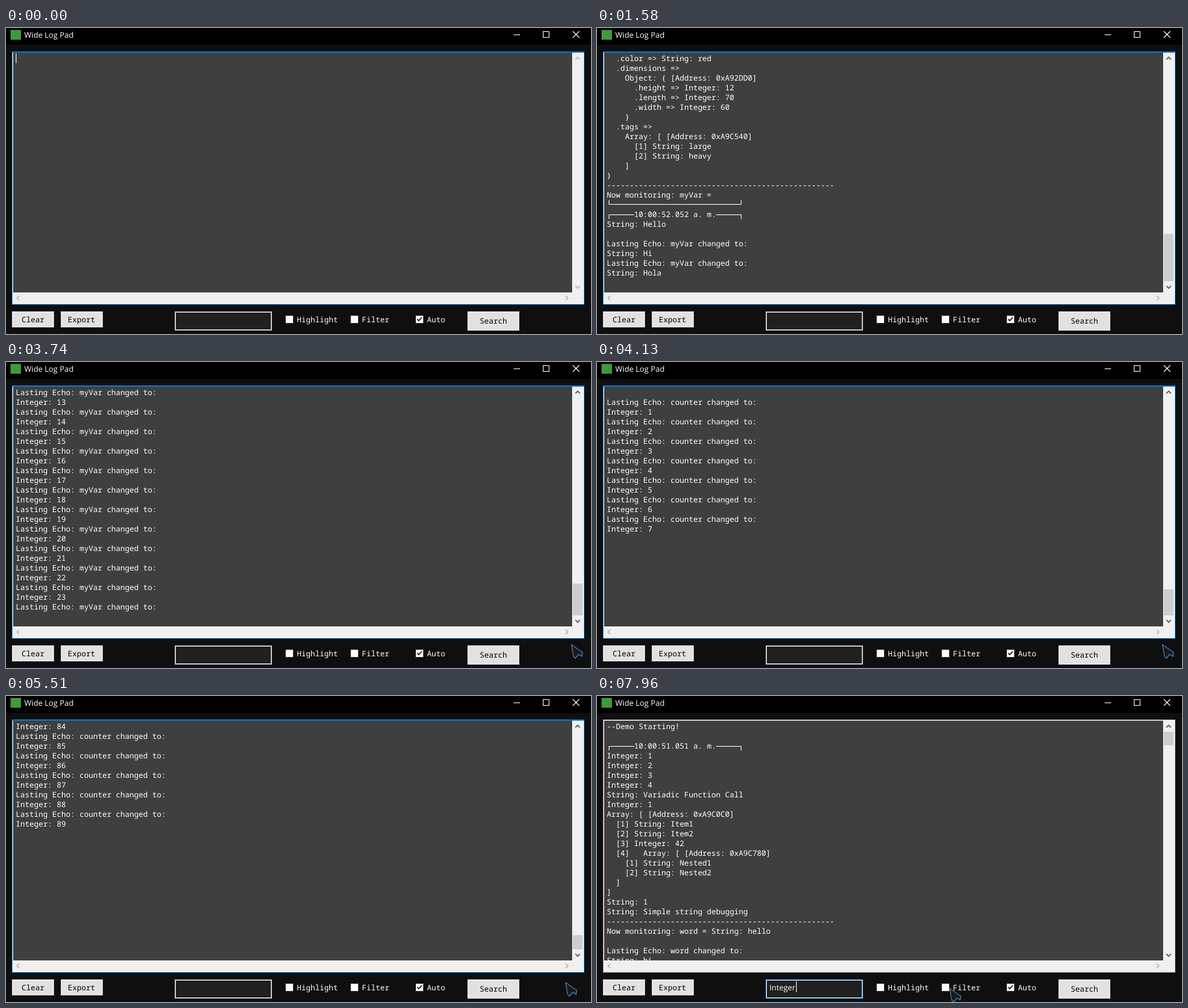
Animation of 899x471 px, one loop 8000 ms. Source, as an HTML page with a canvas:

```html
<!DOCTYPE html>
<html lang="en">
<head>
<meta charset="utf-8">
<style>
  html, body { margin: 0; width: 100%; height: 100%; overflow: hidden; background: #0f0f0f; }
  canvas { display: block; }
</style>
</head>
<body>
<canvas id="stage" width="899" height="471"></canvas>
<script>
const ctx = document.getElementById('stage').getContext('2d');
const MONO = '11.667px "Noto Sans Mono", monospace';
const SANS = '12px "Open Sans", sans-serif';
const LOOP = 8000, STEP = 35.8, STEP_START = 2415;
const PASTE = 7440, FIELD_FOCUS = 6570;

// The log: a box header is stored as its corner plus the time
const lines = `--Demo Starting!

┌10:00:51.051 a. m.
Integer: 1
Integer: 2
Integer: 3
Integer: 4
String: Variadic Function Call
Integer: 1
Array: [ [Address: 0xA9C0C0]
  [1] String: Item1
  [2] String: Item2
  [3] Integer: 42
  [4]   Array: [ [Address: 0xA9C780]
    [1] String: Nested1
    [2] String: Nested2
  ]
]
String: 1
String: Simple string debugging
${'-'.repeat(50)}
Now monitoring: word = String: hello
`.split('\n');

const addChange = (name, value) => lines.push(`Lasting Echo: ${name} changed to:`, value);
for (let i = 0; i < 32; i++) addChange('word', 'String: ' + (i % 2 ? 'hello' : 'hi'));
lines.push(...`Object: { [Address: 0xA92D80]
  .color => String: red
  .dimensions =>
    Object: { [Address: 0xA92DD0]
      .height => Integer: 12
      .length => Integer: 70
      .width => Integer: 60
    }
  .tags =>
    Array: [ [Address: 0xA9C540]
      [1] String: large
      [2] String: heavy
    ]
}
${'-'.repeat(50)}
Now monitoring: myVar =
└
┌10:00:52.052 a. m.
String: Hello
`.split('\n'));
const intro = lines.length;
for (const s of ['Hi', 'Hola', 'H', 'o', 'l', 'a']) addChange('myVar', 'String: ' + s);
const words = lines.length;
for (let i = 1; i <= 33; i++) addChange('myVar', 'Integer: ' + i);
lines.push('-'.repeat(50), 'Now monitoring: counter = Integer: 0', '');
const counters = lines.length;
for (let i = 1; i <= 100; i++) addChange('counter', 'Integer: ' + i);

const wordTimes = [1320, 1580, 2050, 2420, 2830, 3190];
const countTrack = [[22, words], [44, counters], [47, counters + 14], [66, counters + 99],
                    [86, counters + 178], [91, counters + 198]];
const rowsTrack = [[40, 23], [44, 15], [47, 15], [66, 18], [86, 11]];
const cursorX = [[2440, 899], [2680, 868], [4900, 868], [5400, 859], [5700, 859],
                 [6450, 340], [7660, 340], [7940, 541]];
const cursorY = [[2440, 420], [2680, 434], [4900, 434], [5400, 440], [5700, 440], [6450, 449]];

const smooth = k => k * k * (3 - 2 * k);

function track(points, x, ease = k => k) {
  if (x <= points[0][0]) return points[0][1];
  for (let i = 1; i < points.length; i++) {
    const [x0, y0] = points[i - 1], [x1, y1] = points[i];
    if (x < x1) return y0 + (y1 - y0) * ease((x - x0) / (x1 - x0));
  }
  return points[points.length - 1][1];
}

function rect(color, x, y, w, h) {
  ctx.fillStyle = color;
  ctx.fillRect(x, y, w, h);
}

function text(str, x, y, color = '#fff', font = MONO) {
  ctx.font = font;
  ctx.fillStyle = color;
  ctx.fillText(str, x, y);
}

function path(color, width, ...points) {
  ctx.strokeStyle = color;
  ctx.lineWidth = width;
  ctx.beginPath();
  points.forEach(([x, y]) => ctx.lineTo(x, y));
  ctx.stroke();
}

// Chevron pointing along (dx, dy)
function arrow(x, y, dx, dy, color) {
  path(color, 1.7, [x - 2 * dx - 3.5 * dy, y - 2 * dy - 3.5 * dx], [x + 1.5 * dx, y + 1.5 * dy],
       [x - 2 * dx + 3.5 * dy, y - 2 * dy + 3.5 * dx]);
}

function button(label, x, w, h, tx, ty) {
  rect('#adadad', x, 436, w, h);
  rect('#f4f4f4', x + 1, 437, w - 2, h - 2);
  rect('#e1e1e1', x + 2, 438, w - 4, h - 4);
  text(label, tx, ty, '#000');
}

function checkbox(label, x, checked) {
  rect('#333', x, 442, 13, 13);
  rect('#fff', x + 1, 443, 11, 11);
  if (checked) path('#111', 1.7, [x + 3, 448], [x + 5.3, 450.5], [x + 10, 445.5]);
  text(label, x + 18, 453);
}

function logLine(line, y) {
  if (line[0] === '┌') {
    rect('#fff', 18, y - 4, 39, 1);
    rect('#fff', 183, y - 4, 39, 1);
    for (const x of [18, 221]) rect('#fff', x, y - 4, 1, 7);
    text(line.slice(1), 57, y);
  } else if (line[0] === '└') {
    rect('#fff', 18, y - 5, 204, 1);
    for (const x of [18, 221]) rect('#fff', x, y - 11, 1, 7);
  } else {
    text(line, 15, y);
  }
}

function logState(t) {
  const step = Math.floor((t - STEP_START) / STEP);
  if (t < 60) return { count: 0, top: 0 };
  if (t < 1320) {
    const part = Math.min(9, Math.floor((t - 60) / 36) + 1) / 9;
    return { count: Math.round(intro * part), top: 0 };
  }
  const count = step < 22
    ? intro + 2 * wordTimes.filter(w => t >= w).length
    : Math.round(track(countTrack, step));
  const top = step >= 90 ? 0 : count - Math.round(track(rowsTrack, step));
  return { count, top };
}

const blink = (t, start) => Math.floor((t - start) / 200) % 2 === 0;

function drawTitle() {
  rect('#000', 0, 0, 899, 26);
  ctx.fillStyle = '#3f9a3c';
  ctx.fillRect(7, 3, 16, 15);
  text('Wide Log Pad', 28, 15, '#fff', SANS);
  rect('#fff', 780, 10, 10, 1);
  ctx.strokeStyle = '#fff';
  ctx.lineWidth = 1;
  ctx.strokeRect(825.5, 5.5, 9, 9);
  path('#fff', 1.1, [871, 5], [881, 15]);
  path('#fff', 1.1, [881, 5], [871, 15]);
}

function drawLog(t) {
  const { count, top } = logState(t);
  const focused = t < FIELD_FOCUS;
  rect(focused ? '#0078d7' : '#7a7a7a', 9, 36, 880, 390);
  rect('#fff', 10, 37, 878, 388);
  if (focused) rect('#0078d7', 10, 37, 878, 1);
  rect('#f0f0f0', 11, 38, 876, 387);
  rect('#3f3f3f', 11, 38, 859, 369);

  ctx.save();
  ctx.beginPath();
  ctx.rect(11, 38, 859, 369);
  ctx.clip();
  for (let i = top; i < Math.min(count, top + 25); i++) logLine(lines[i], 51 + 15 * (i - top));
  const caretStart = t < 1320 ? 350 : 5660;
  if (focused && top === 0 && (t < 350 || blink(t, caretStart))) rect('#fff', 15, 39, 1, 15);
  ctx.restore();

  const scrolls = count > 24;
  if (scrolls) {
    const size = Math.round(335 * 24.5 / (count + 1));
    rect('#cdcdcd', 871, top ? 390 - size : 55, 15, size);
  }
  const vertical = scrolls ? '#505050' : '#b5b5b5';
  arrow(878.5, 46.5, 0, -1, vertical);
  arrow(878.5, 399, 0, 1, vertical);
  arrow(18.5, 415.5, -1, 0, '#b5b5b5');
  arrow(862, 415.5, 1, 0, '#b5b5b5');
}

function drawControls(t) {
  button('Clear', 9, 65, 25, 24, 453);
  button('Export', 84, 65, 25, 95, 453);
  button('Search', 709, 80, 30, 728, 455);
  checkbox('Highlight', 429, false);
  checkbox('Filter', 529, false);
  checkbox('Auto', 629, true);

  const focused = t >= FIELD_FOCUS, pasted = t >= PASTE;
  rect(focused ? '#0078d7' : '#7a7a7a', 259, 436, 150, 30);
  rect('#fff', 260, 437, 148, 28);
  rect('#202020', 261, 438, 146, 26);
  if (pasted) text('Integer', 265, 453, '#fff', SANS);
  if (focused && blink(t, pasted ? PASTE : FIELD_FOCUS)) rect('#fff', pasted ? 306 : 265, 439, 1, 17);
}

function drawCursor(t) {
  if (t < 2440) return;
  ctx.save();
  ctx.translate(track(cursorX, t, smooth), track(cursorY, t, smooth));
  const edge = ctx.createLinearGradient(2, 4, 15, 20);
  edge.addColorStop(0, '#66727a');
  edge.addColorStop(0.6, '#3f6f92');
  edge.addColorStop(1, '#2f95d8');
  ctx.fillStyle = '#181a1d';
  ctx.strokeStyle = edge;
  ctx.lineWidth = 1.4;
  ctx.lineJoin = 'round';
  ctx.beginPath();
  for (const [x, y] of [[1, 1], [18, 13], [17, 19], [12, 16], [7, 22], [4, 19]]) ctx.lineTo(x, y);
  ctx.closePath();
  ctx.fill();
  ctx.stroke();
  ctx.restore();
}

function draw(now) {
  const t = now % LOOP;
  ctx.textRendering = 'geometricPrecision';
  rect('#0f0f0f', 0, 0, 899, 471);
  drawTitle();
  drawLog(t);
  drawControls(t);
  drawCursor(t);
  requestAnimationFrame(draw);
}

const start = performance.now();
requestAnimationFrame(function frame() {
  draw(0);
});
</script>
</body>
</html>
```
